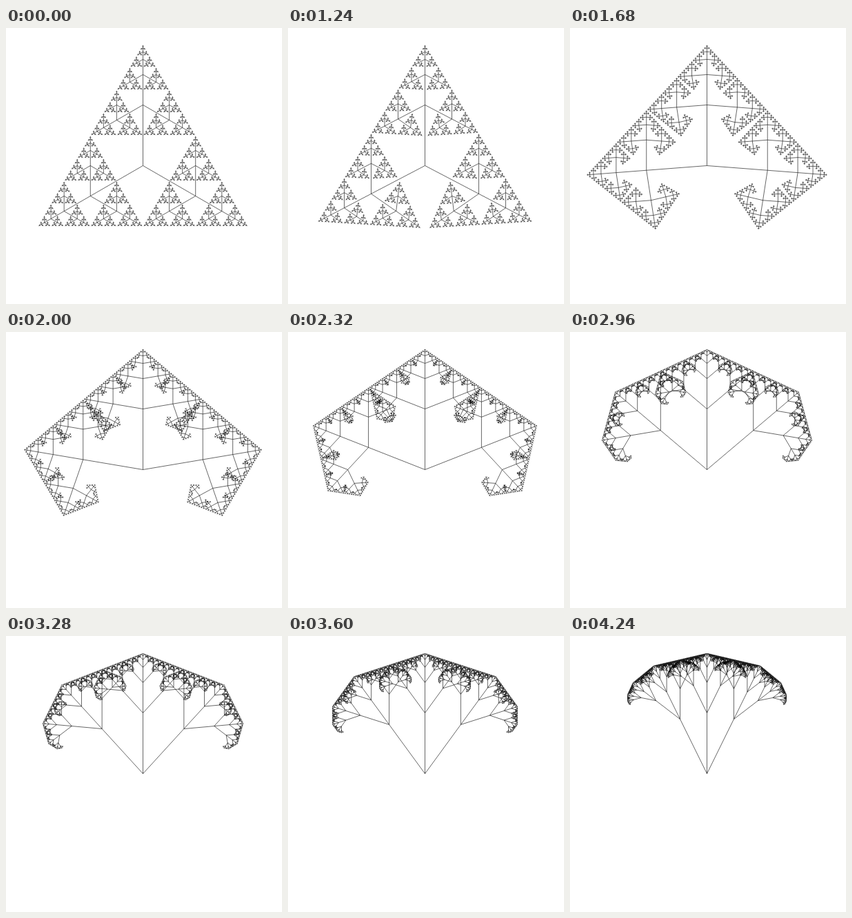
An HTML page with a canvas that plays this animation: 400 px wide and 400 px high, repeating every 5920 ms.

```html
<!DOCTYPE html>
<html lang="en">
<head>
<meta charset="utf-8">
<title>Folding ternary tree</title>
<style>
  html, body { margin: 0; width: 100%; height: 100%; overflow: hidden; background: #fff; }
  canvas { display: block; }
</style>
</head>
<body>
<canvas id="tree" width="400" height="400"></canvas>
<script>
const SIZE = 400;
const LOOP = 5920;
const HOLD = 1200;   // pause on the open triangle
const STEP = 40;
const LAST = 76;     // steps until the tree is folded
const DEPTH = 7;
const TRUNK = 88;
const ROOT = { x: 198.5, y: 199.5 };

const ctx = document.getElementById('tree').getContext('2d');
ctx.strokeStyle = '#000';
ctx.lineWidth = 0.6;

// Each branch is stroked alone, so crowded twigs build up to black
function line(x0, y0, x1, y1) {
  ctx.beginPath();
  ctx.moveTo(x0, y0);
  ctx.lineTo(x1, y1);
  ctx.stroke();
}

function grow(x, y, heading, length, spread, depth) {
  if (!depth) return;
  for (let side = -1; side <= 1; side++) {
    const a = heading + side * spread;
    const tx = x + length * Math.sin(a);
    const ty = y - length * Math.cos(a);
    line(x, y, tx, ty);
    grow(tx, ty, a, length / 2, spread, depth - 1);
  }
}

function draw(step) {
  const spread = 2 * Math.PI / 3 * Math.exp(-step / 50);
  ctx.fillStyle = '#fff';
  ctx.fillRect(0, 0, SIZE, SIZE);
  grow(ROOT.x, ROOT.y, 0, TRUNK, spread, DEPTH);
}

const start = performance.now();
let shown = -1;

function tick() {
  const t = (performance.now() - start) % LOOP;
  const step = Math.min(LAST, Math.max(0, Math.floor((t - HOLD) / STEP)));
  if (step !== shown) draw(shown = step);
  requestAnimationFrame(tick);
}
tick();
</script>
</body>
</html>
```
